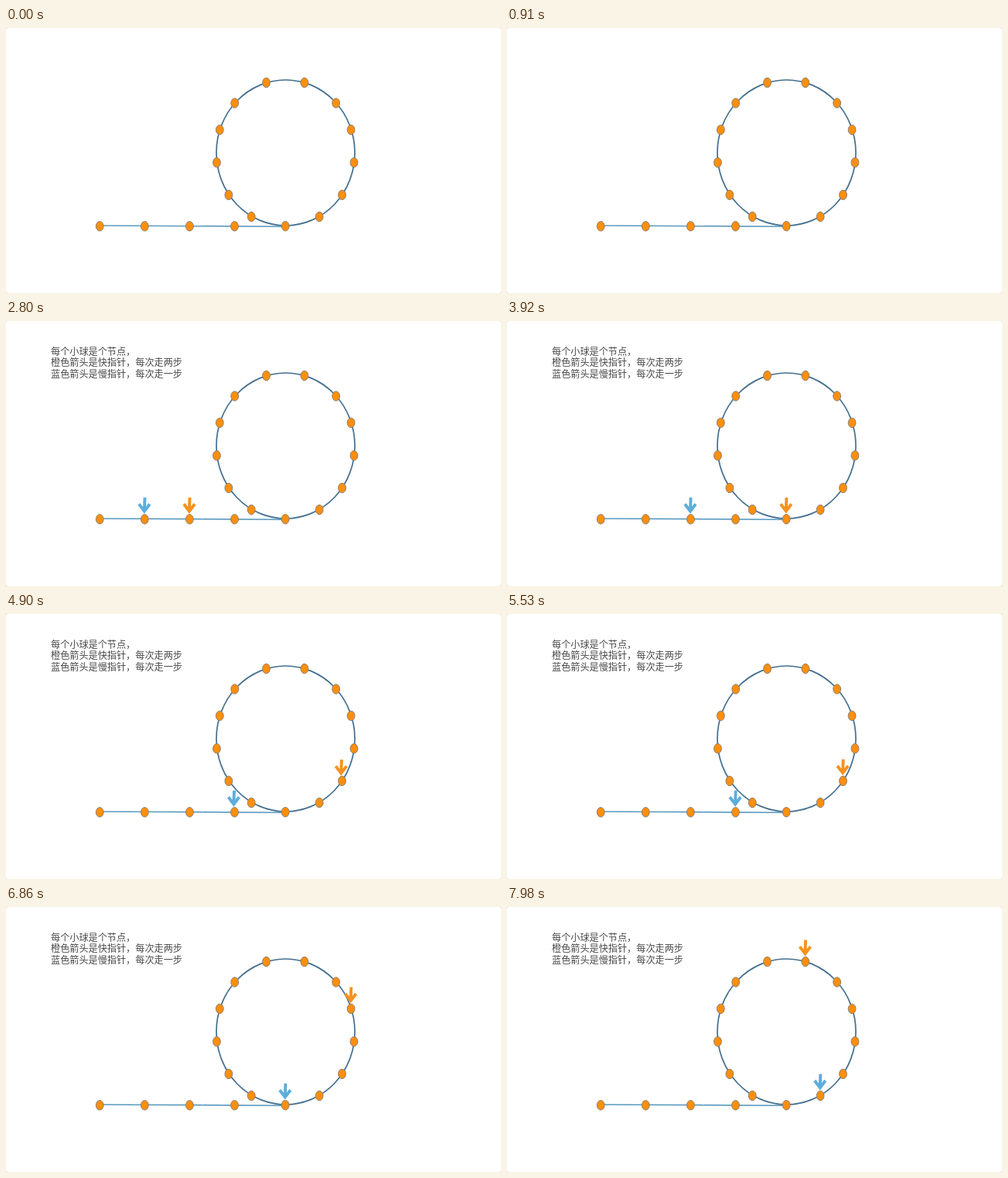
Animation, 640 px wide and 342 px high, one loop 8000 ms. Source, as an HTML page:

```html
<!DOCTYPE html>
<html lang="zh-CN">
<head>
<meta charset="utf-8">
<style>
html, body { margin: 0; width: 100%; height: 100%; overflow: hidden; background: #bbb; }
svg { display: block; width: 100vw; height: 100vh; }
text { font: 300 12.15px "Noto Sans CJK SC", "Noto Sans CJK", sans-serif; fill: #484848; }
#nodes { fill: #ff8f0c; stroke: #8a7e72; }
.arrow { fill: none; stroke-width: 3.9; }
</style>
</head>
<body>
<svg viewBox="0 0 640 342" preserveAspectRatio="none">
  <defs><path id="arrow" d="M.6-21L0-4M-7-12.5L0-3.3L7-12.5"/></defs>
  <rect width="640" height="342" rx="2" fill="#fff"/>
  <path d="M121 255L361 256.2" stroke="#5b9bc0" stroke-width="1.6"/>
  <ellipse cx="361.5" cy="161" rx="89.5" ry="94" fill="none" stroke="#446f8f" stroke-width="1.7"/>
  <g id="nodes"></g>
  <g id="guide">
    <text x="58" y="43.5">每个小球是个节点，</text>
    <text x="58" y="58">橙色箭头是快指针，每次走两步</text>
    <text x="58" y="72.5">蓝色箭头是慢指针，每次走一步</text>
    <use id="slow" class="arrow" href="#arrow" stroke="#5caedb"/>
    <use id="fast" class="arrow" href="#arrow" stroke="#f6921e"/>
  </g>
</svg>
<script>
const LOOP = 8000, SHOW = 1610, FIRST = 1801, STEP = 1353, MOVE = 420;
const $ = id => document.getElementById(id);

// The ring is mirrored: half of its angles, counted from the bottom, give all
const half = [29.4, 55, 82.5, 108.5, 133, 164];
const ring = [0, ...half, ...half.map(a => 360 - a).reverse()];
const tail = [0, 1, 2, 3].map(i => [121.2 + 58.1 * i, 255.8]);
const nodes = tail.concat(ring.map(deg => {
  const a = deg * Math.PI / 180;
  return [361.2 + 89.5 * Math.sin(a), 161.3 + 94.4 * Math.cos(a)];
}));
$('nodes').innerHTML = nodes.map(([x, y]) =>
  `<ellipse cx="${x}" cy="${y}" rx="4.9" ry="6.2"/>`).join('');

// An arrow that jumps `stride` nodes with every step
function place(id, stride, t) {
  const s = Math.max(t - FIRST, 0), n = Math.floor(s / STEP);
  const u = Math.min(s % STEP / MOVE, 1), k = u * u * (3 - 2 * u);
  const from = nodes[n * stride], to = nodes[(n + 1) * stride];
  const [x, y] = from.map((a, i) => a + (to[i] - a) * k);
  $(id).setAttribute('transform', `translate(${x - .4} ${y - 7})`);
}

function draw(now) {
  const t = now % LOOP;
  $('guide').style.display = t < SHOW ? 'none' : '';
  place('slow', 1, t);
  place('fast', 2, t);
  requestAnimationFrame(draw);
}
draw(0);
</script>
</body>
</html>
```
